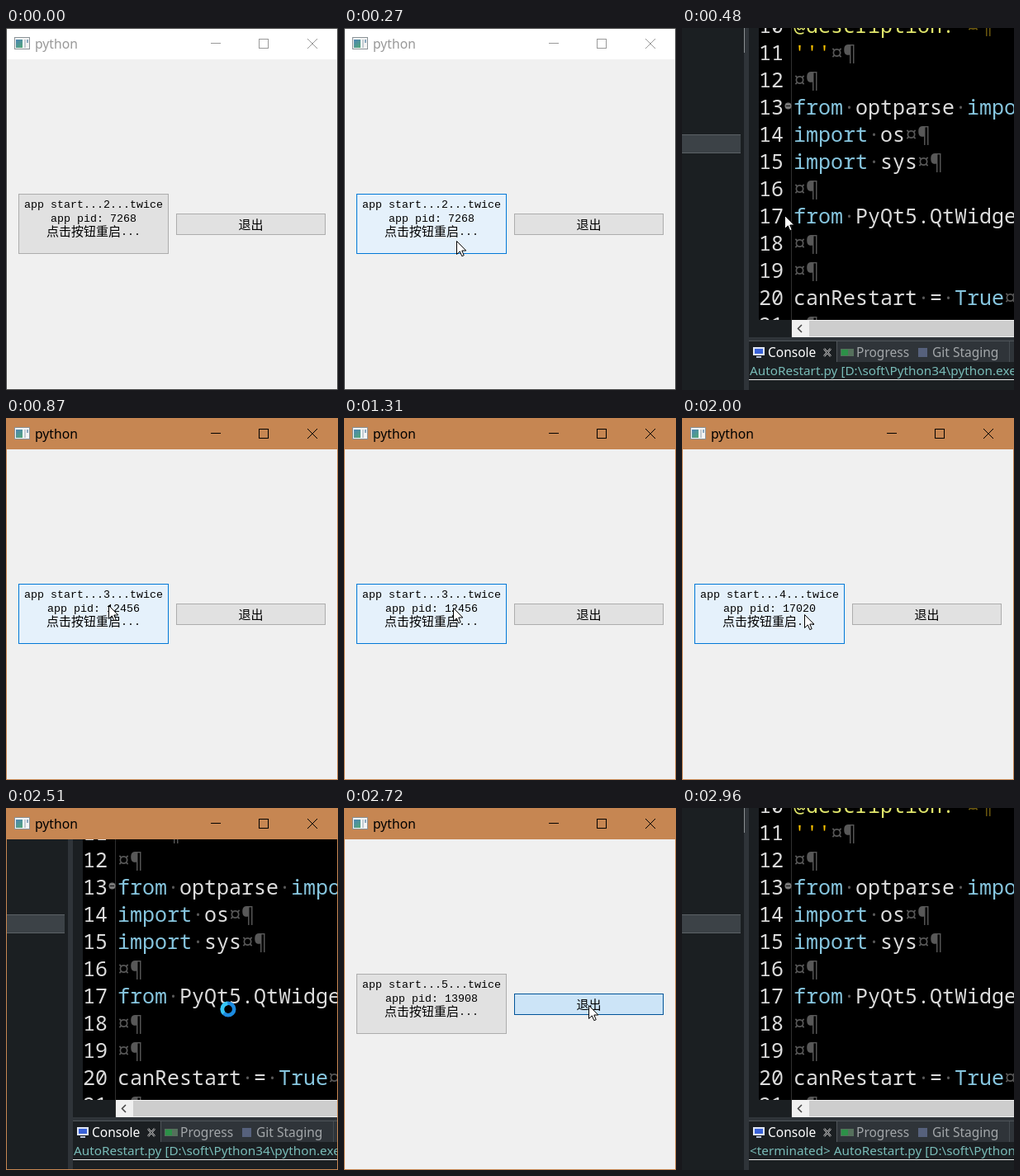
These frames come from a looping animation (402 by 439 pixels, 3270 ms). An HTML page with a canvas:

```html
<!DOCTYPE html>
<html lang="en">
<head>
<meta charset="utf-8">
<title>Auto restart</title>
<style>
  html, body { margin: 0; width: 100%; height: 100%; overflow: hidden; background: #000; }
  canvas { display: block; width: 402px; height: 439px; }
</style>
</head>
<body>
<canvas id="stage" width="402" height="439"></canvas>
<script>
const ctx = document.getElementById('stage').getContext('2d');
const W = 402, H = 439, LOOP = 3270;
const UI = '"Noto Sans", "Open Sans", sans-serif';
const CODE = '25px "Noto Sans Mono", monospace';
const LATIN = '13.33px "Liberation Mono", monospace';
const HAN = '15px "Noto Sans CJK SC", "Noto Sans CJK", sans-serif';
const PLAIN = '#dcdcdc', KEYWORD = '#86c5de', MARK = '#585858';
const ACCENT = '#c68652';

// Successive runs of the restarting app.
const runs = [
  { open: 0, paint: 0, active: 330, press: 360, close: 420, count: 2, pid: 7268 },
  { open: 610, paint: 640, active: 610, press: 1460, close: 1550, count: 3, pid: 12456 },
  { open: 1760, paint: 1790, active: 1760, press: 2300, close: 2390, count: 4, pid: 17020 },
  { open: 2510, paint: 2540, active: 2510, press: 2720, close: 2780, count: 5, pid: 13908 }
];
const restartButton = { x: 15, y: 201, w: 182, h: 73 };
const exitButton = { x: 206, y: 225, w: 181, h: 26 };

// Pointer path: time, x, y.
const path = [
  [30, 205, 439], [300, 128, 236], [480, 124, 227], [1060, 124, 227],
  [1300, 132, 230], [1580, 137, 238], [1760, 138, 238], [2000, 148, 238],
  [2090, 151, 239], [2150, 151, 239], [2390, 178, 239], [2510, 269, 244],
  [2660, 296, 239], [2720, 296, 239], [2780, 299, 241], [2930, 405, 300]
];
// Pointer shape from each time on.
const shapes = [
  [0, null], [30, 'arrow'], [610, null], [870, 'arrow'], [1580, 'beam'], [1760, 'ring'],
  [1790, 'arrow'], [2420, 'beam'], [2510, 'ring'], [2540, 'arrow'], [2930, null]
];

function pointerAt(t) {
  const i = path.findIndex(p => p[0] > t);
  if (i < 0) return path[path.length - 1].slice(1);
  if (i === 0) return path[0].slice(1);
  const a = path[i - 1], b = path[i], k = (t - a[0]) / (b[0] - a[0]);
  return [a[1] + (b[1] - a[1]) * k, a[2] + (b[2] - a[2]) * k].map(Math.round);
}

function box(x, y, w, h, fill) {
  ctx.fillStyle = fill;
  ctx.fillRect(x, y, w, h);
}

function frame(x, y, w, h, color) {
  ctx.strokeStyle = color;
  ctx.lineWidth = 1;
  ctx.strokeRect(x + .5, y + .5, w - 1, h - 1);
}

function line(points, color, width = 1) {
  ctx.beginPath();
  points.forEach(([x, y]) => ctx.lineTo(x, y));
  ctx.strokeStyle = color;
  ctx.lineWidth = width;
  ctx.stroke();
}

function text(str, x, y, color, font) {
  ctx.font = font;
  ctx.fillStyle = color;
  ctx.fillText(str, x, y);
}

function clip(x, y, w, h, draw) {
  ctx.save();
  ctx.beginPath();
  ctx.rect(x, y, w, h);
  ctx.clip();
  draw();
  ctx.restore();
}

function codeLine(number, ...parts) {
  const y = 237 + (number - 17) * 33;
  text(number, 93, y, PLAIN, CODE);
  let x = 135;
  for (const [str, color] of parts) {
    text(str, x, y, color, CODE);
    x += str.length * 15;
  }
}

function drawCode() {
  const end = ['¤¶', MARK], dot = ['·', MARK];
  codeLine(10, ['@description:', '#dde36a'], [' ¤¶', '#6d5a10']);
  codeLine(11, ["'''", '#ffc600'], end);
  codeLine(13, ['from', KEYWORD], dot, ['optparse', PLAIN], dot, ['impo', KEYWORD]);
  codeLine(14, ['import', KEYWORD], dot, ['os', PLAIN], end);
  codeLine(15, ['import', KEYWORD], dot, ['sys', PLAIN], end);
  codeLine(17, ['from', KEYWORD], dot, ['PyQt5.QtWidge', PLAIN]);
  codeLine(20, ['canRestart', PLAIN], dot, ['=', PLAIN], dot, ['True', KEYWORD], end);
  [12, 16, 18, 19, 21].forEach(n => codeLine(n, end));
}

function drawTabs() {
  box(81, 380, 321, 25, '#2f3439');
  box(81, 380, 107, 25, '#1b1f22');
  line([[81, 379.5], [402, 379.5]], '#50565b');
  line([[187.5, 380], [187.5, 405]], '#50565b');
  box(86, 387, 14, 10, '#dfe6f5');
  box(88, 389, 10, 6, '#3a62d8');
  box(90, 398, 6, 2, '#b9c3d8');
  text('Console', 104, 399, '#fff', `15.5px ${UI}`);
  line([[172, 389], [180, 398]], '#c8c8c8', 2.5);
  line([[180, 389], [172, 398]], '#c8c8c8', 2.5);
  line([[172, 389], [180, 398]], '#1b1f22');
  line([[180, 389], [172, 398]], '#1b1f22');
  box(192, 389, 16, 9, '#55705c');
  box(193, 390, 8, 7, '#2c9148');
  text('Progress', 211, 399, '#a2a6a9', `15.5px ${UI}`);
  box(286, 388, 11, 11, '#56617c');
  text('Git Staging', 303, 399, '#a2a6a9', `15.5px ${UI}`);
  line([[396.5, 380], [396.5, 405]], '#454b50');
}

function drawEditor(t) {
  box(0, 0, W, H, '#1b1f22');
  box(75, 0, 6, H, '#2f3439');
  box(75, 0, 1, 30, '#8b8f92');
  box(0, 129, 71, 23, '#3c4247');
  box(0, 129, 71, 1, '#5c6266');
  box(0, 151, 71, 1, '#5c6266');
  box(93, 0, 309, 354, '#000');
  box(132, 0, 1, 375, '#303030');
  clip(93, 0, 309, 354, drawCode);

  ctx.beginPath();
  ctx.arc(128.5, 94.5, 4, 0, 7);
  ctx.fillStyle = '#777';
  ctx.fill();
  box(126, 94, 5, 1, '#111');

  box(133, 354, 269, 21, '#f0f0f0');
  box(154, 355, 248, 19, '#cdcdcd');
  line([[145, 360], [140.5, 364.5], [145, 369]], '#444', 1.5);
  box(81, 375, 321, 5, '#2f3439');
  drawTabs();

  const path = 'AutoRestart.py [D:\\soft\\Python34\\python.exe]';
  text((t >= 2900 ? '<terminated> ' : '') + path, 82, 421, '#79bcb8', `15.3px ${UI}`);
  box(81, 426, 321, 1, '#e8e8e8');
}

function button(b, hover, pressed) {
  box(b.x, b.y, b.w, b.h, pressed ? '#cce4f7' : hover ? '#e5f1fb' : '#e1e1e1');
  frame(b.x, b.y, b.w, b.h, pressed ? '#005499' : hover ? '#0078d7' : '#adadad');
}

function drawWindow(run, t, [px, py]) {
  const active = t >= run.active, ink = active ? '#000' : '#999';
  const inside = b => px >= b.x && px < b.x + b.w && py >= b.y && py < b.y + b.h;
  const pressed = t >= run.press;

  if (t >= run.paint) {
    box(0, 38, W, H - 38, '#f0f0f0');
    for (const b of [restartButton, exitButton]) button(b, inside(b), inside(b) && pressed);
    ctx.textAlign = 'center';
    text(`app start...${run.count}...twice`, 106, 218, '#000', LATIN);
    text(`app pid: ${run.pid}`, 106, 235, '#000', LATIN);
    text('退出', 296.5, 243.5, '#000', HAN);
    ctx.textAlign = 'left';
    text('点击按钮重启', 49, 251.5, '#000', HAN);
    text('...', 139, 251, '#000', LATIN);
  }

  box(0, 0, W, 38, active ? ACCENT : '#fff');
  frame(0, 0, W, H, active ? ACCENT : '#454545');

  box(10, 11, 19, 15, '#f4f4f4');
  const tint = ctx.createLinearGradient(12, 14, 20, 24);
  tint.addColorStop(0, '#4b83b4');
  tint.addColorStop(1, '#53a878');
  box(12, 14, 8, 10, tint);
  box(22, 14, 2, 10, '#c4ccd2');
  box(25, 14, 2, 4, '#8daac0');
  frame(10, 11, 19, 15, '#8a9296');

  text('python', 35, 25, ink, `15.7px ${UI}`);
  box(248, 18, 12, 1, ink);
  frame(306, 13, 12, 12, ink);
  line([[365, 13], [377, 25]], ink);
  line([[377, 13], [365, 25]], ink);
}

const arrow = new Path2D('M.5.5V16.5L4.3 12.9 6.8 18.7 9.2 17.7 6.8 12H11.8Z');
const pointers = {
  arrow() {
    ctx.fillStyle = '#fff';
    ctx.fill(arrow);
    ctx.strokeStyle = '#000';
    ctx.lineWidth = 1;
    ctx.stroke(arrow);
  },
  beam() {
    box(-3, -7, 3, 1, '#fff');
    box(1, -7, 3, 1, '#fff');
    box(0, -6, 1, 13, '#fff');
    box(-3, 7, 3, 1, '#fff');
    box(1, 7, 3, 1, '#fff');
  },
  ring() {
    const arc = (from, to, color) => {
      ctx.beginPath();
      ctx.arc(0, 0, 7.2, from, to);
      ctx.strokeStyle = color;
      ctx.lineWidth = 4.6;
      ctx.stroke();
    };
    arc(0, 2 * Math.PI, '#1c8be0');
    arc(2.4, 4.6, '#35c5f5');
  }
};

function render(t) {
  const pointer = pointerAt(t);
  drawEditor(t);
  const run = runs.find(r => t >= r.open && t < r.close);
  if (run) drawWindow(run, t, pointer);

  const shape = shapes.filter(s => s[0] <= t).pop()[1];
  if (shape) {
    ctx.save();
    ctx.translate(...pointer);
    pointers[shape]();
    ctx.restore();
  }
}

const start = performance.now();
function tick() {
  render((performance.now() - start) % LOOP);
  requestAnimationFrame(tick);
}
tick();
</script>
</body>
</html>
```
